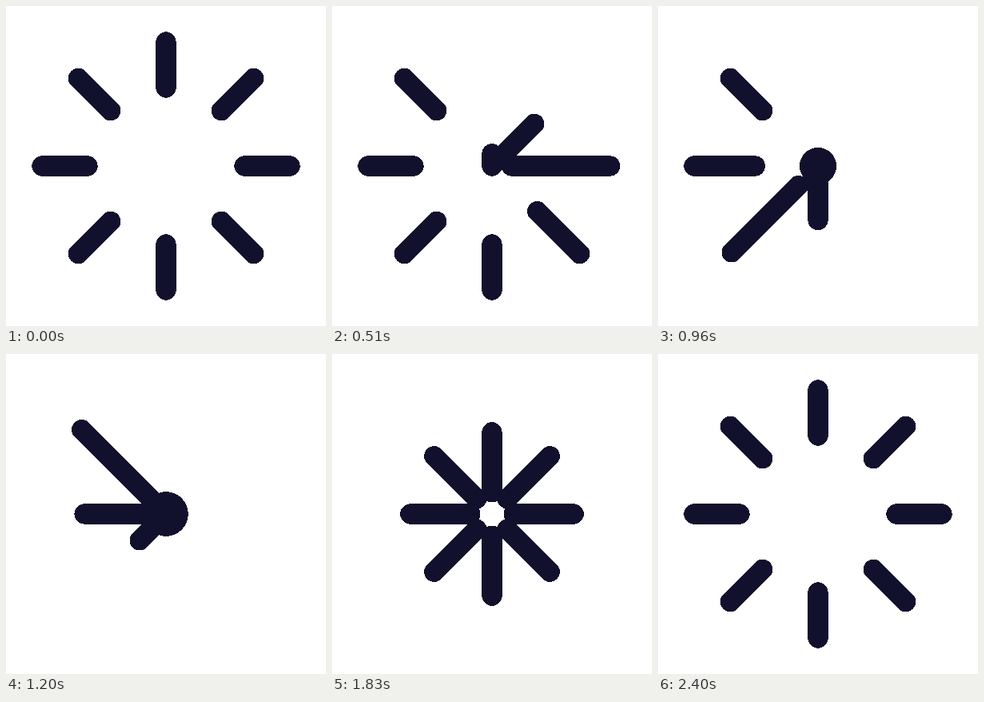
An HTML page for the animation above (2430 ms loop, 400 by 400 pixels).

```html
<!DOCTYPE html>
<html lang="en">
<head>
<meta charset="utf-8">
<title>Spoke loader</title>
<style>
  html, body { margin: 0; width: 100%; height: 100%; overflow: hidden; background: #fff; }
  svg { display: block; width: 100%; height: 100%; shape-rendering: crispEdges; }
  line { stroke: #11112d; stroke-width: 25.3; stroke-linecap: round; }
  circle { fill: #11112d; }
</style>
</head>
<body>
<svg viewBox="-200 -200 400 400"><circle id="hub" r="0"/></svg>
<script>
  const LOOP = 2430;
  const INNER = 98, OUTER = 155;
  const CAP = 12.7, HUB = 33;
  // Clockwise from the top: when each spoke starts to retract
  const STARTS = [0, 125, 287, 420, 562, 762, 866, 983];
  const HUB_ON = 594, BURST = 1572, HUB_OFF = 1690;

  const svg = document.querySelector('svg');
  const hub = document.getElementById('hub');
  const spokes = STARTS.map((start, i) => {
    const el = document.createElementNS(svg.namespaceURI, 'line');
    el.setAttribute('transform', `rotate(${i * 45})`);
    svg.append(el);
    return { el, start };
  });

  const span = (t, start, length) => Math.min(1, Math.max(0, (t - start) / length));
  const smooth = s => s * s * (3 - 2 * s);
  const mix = (a, b, p) => a + (b - a) * p;

  // Bezier ease (1/3, 0, 0.2, 1), solved for its parameter by bisection
  function burst(x) {
    let lo = 0, hi = 1;
    for (let k = 0; k < 24; k++) {
      const s = (lo + hi) / 2;
      if (s - 1.4 * s * s + 1.4 * s ** 3 < x) lo = s; else hi = s;
    }
    return x >= 1 ? 1 : smooth(lo);
  }

  function ends(t, start) {
    if (t < BURST + 20) {
      return [
        INNER * (1 - smooth(span(t, start, 333))),
        OUTER * (1 - smooth(span(t, start + 167, 427)))
      ];
    }
    return [
      INNER * burst(span(t, 1652, 756)),
      OUTER * burst(span(t, BURST, 640))
    ];
  }

  // The hub's area grows evenly as spokes are absorbed
  function hubRadius(t) {
    if (t < HUB_ON || t > HUB_OFF) return 0;
    return Math.sqrt(mix(CAP ** 2, HUB ** 2, span(t, HUB_ON, 916)));
  }

  function draw(t) {
    for (const { el, start } of spokes) {
      const [inner, outer] = ends(t, start);
      el.setAttribute('y1', -inner);
      el.setAttribute('y2', -outer);
    }
    hub.setAttribute('r', hubRadius(t));
  }

  const t0 = performance.now();
  function tick() {
    draw((performance.now() - t0) % LOOP);
    requestAnimationFrame(tick);
  }
  draw(0);
  requestAnimationFrame(tick);
</script>
</body>
</html>
```
